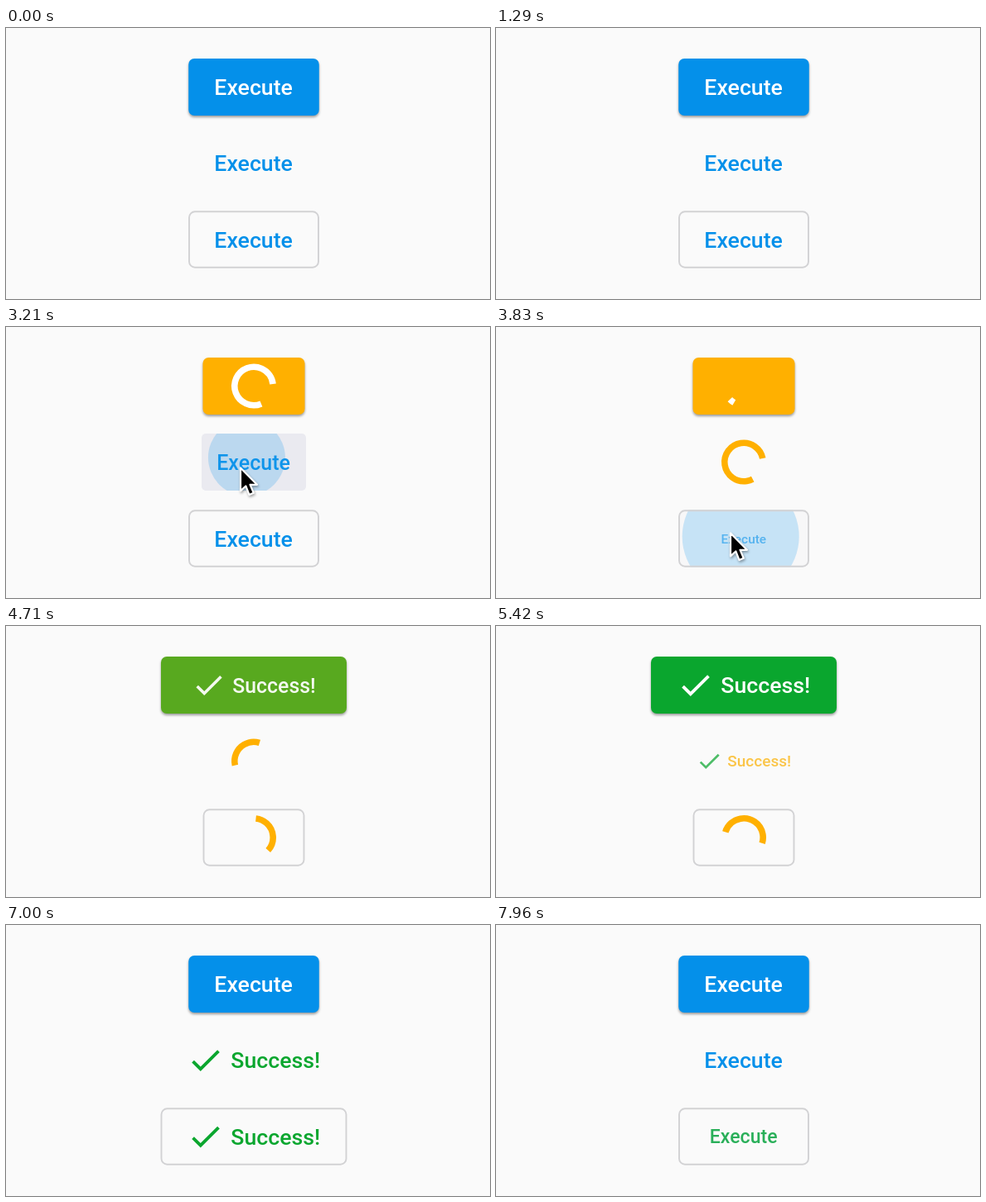
An HTML page that plays this animation: 584x328 px, repeating every 8000 ms.

```html
<!DOCTYPE html>
<html lang="en">
<head>
<meta charset="utf-8">
<title>Button states</title>
<style>
html, body { margin: 0; width: 100%; height: 100%; overflow: hidden; background: #fafafa; }
svg { display: block; width: 100vw; height: 100vh; }
text { font: 500 26.7px Roboto, sans-serif; }
</style>
</head>
<body>
<svg id="stage" viewBox="0 0 584 328"></svg>
<script>
const LOOP = 8000, MID = 299, HEIGHT = 69;
const LEAVE = 200, ENTER = 200, RESIZE_AT = 130, RESIZE = 160, TINT = 280;
const IDLE = 0;
const BLUE = [4, 144, 234], AMBER = [255, 176, 0], GREEN = [10, 166, 46];
const WHITE = '#fff';

const clamp = v => Math.min(1, Math.max(0, v));
const ramp = (t, start, length) => clamp((t - start) / length);
const lerp = (a, b, k) => a + (b - a) * k;
const smooth = x => x * x * (3 - 2 * x);
const mix = (a, b, k) => `rgb(${a.map((v, i) => Math.round(lerp(v, b[i], k)))})`;
const plain = color => mix(color, color, 0);

// cubic-bezier(.4, 0, .2, 1)
function ease(x) {
  let lo = 0, hi = 1, u = .5;
  for (let i = 0; i < 18; i++) {
    u = (lo + hi) / 2;
    const px = 1.2 * u * (1 - u) ** 2 + .6 * u * u * (1 - u) + u ** 3;
    if (px < x) lo = u; else hi = u;
  }
  return x <= 0 ? 0 : x >= 1 ? 1 : u * u * (3 - 2 * u);
}

function el(parent, tag, attrs = {}, text = '') {
  const node = document.createElementNS('http://www.w3.org/2000/svg', tag);
  set(node, attrs);
  node.textContent = text;
  return parent.appendChild(node);
}

function set(node, attrs) {
  for (const key in attrs) node.setAttribute(key, attrs[key]);
}

const stage = document.getElementById('stage');
const defs = el(stage, 'defs');

// changes: start of loading, success and reset
const buttons = [
  { kind: 'solid', y: 71.5, press: 2440, changes: [2570, 4374, 6462], spin: 2520, turn: -100,
    widths: [157.5, 123, 224], ripple: WHITE, reach: 82, hover: 0 },
  { kind: 'text', y: 163.5, press: 3100, changes: [3182, 5130, 7080], spin: 3002, turn: -158,
    widths: [126, 123, 193], ripple: plain(BLUE), reach: 68, hover: 1 },
  { kind: 'outline', y: 256, press: 3675, changes: [3767, 5818, 7644], spin: 3611, turn: -156,
    widths: [156, 121, 223], ripple: plain(BLUE), reach: 82, hover: .2 }
];

buttons.forEach((b, i) => {
  const solid = b.kind === 'solid';
  const clip = el(defs, 'clipPath', { id: 'clip' + i });
  b.clip = el(clip, 'rect', { rx: 7 });
  b.box = el(stage, 'rect', { rx: 7, fill: 'none' });
  b.glow = el(stage, 'rect', { rx: 5, fill: '#eaeaf0' });
  const inner = el(stage, 'g', { 'clip-path': `url(#clip${i})` });
  b.wave = el(inner, 'circle', { fill: b.ripple });
  if (b.kind === 'outline') {
    b.line = el(stage, 'rect', { rx: 7, fill: 'none', stroke: '#d2d2d4', 'stroke-width': 1.9 });
  }
  b.content = el(stage, 'g');

  const idle = el(b.content, 'g');
  b.label = el(idle, 'text', { x: -.4, y: 9.8, 'text-anchor': 'middle', fill: WHITE }, 'Execute');

  const loading = el(b.content, 'g');
  b.ring = el(loading, 'circle', {
    r: 23.2, fill: 'none', 'stroke-width': 7.6, pathLength: 125.66,
    stroke: solid ? WHITE : plain(AMBER)
  });

  const done = el(b.content, 'g');
  el(done, 'path', {
    d: 'M21 7 9 19 3.5 13.5 4.91 12.09 9 16.17 19.59 5.59Z',
    transform: 'translate(-81.5 -23) scale(1.92)', fill: solid ? WHITE : plain(GREEN)
  });
  b.message = el(done, 'text', { x: -27.7, y: 9.8, fill: WHITE }, 'Success!');
  b.views = [idle, loading, done];
});

const cursor = el(stage, 'path', {
  d: 'M0 0V30L6.8 23.6 11.3 35 17 32.6 12.4 21.8H21.4Z',
  fill: '#000', stroke: WHITE, 'stroke-width': 2.4, 'stroke-linejoin': 'round',
  style: 'filter: drop-shadow(1px 2px 1.5px rgba(0, 0, 0, .35))'
});

function drawSpinner(b, t) {
  const age = t - b.spin;
  const p = (((age / 1400) % 1) + 1) % 1;
  const grow = smooth(clamp(p * 2)), shift = smooth(clamp(p * 2 - 1));
  const dash = lerp(1, 100, grow);
  const offset = lerp(15 * grow, 125, shift);
  set(b.ring, {
    'stroke-dasharray': `${dash} 200`, 'stroke-dashoffset': -offset,
    transform: `rotate(${b.turn + age * .18})`
  });
}

function drawButton(b, t) {
  const step = b.changes.filter(c => t >= c).length;
  const state = step % 3, before = step ? step - 1 : IDLE;
  const start = step ? b.changes[step - 1] : -LOOP;
  const entered = start + LEAVE;
  const leaving = t < entered;
  const shown = leaving ? before : state;
  const scale = leaving ? 1 - ease(ramp(t, start, LEAVE)) : ease(ramp(t, entered, ENTER));
  const width = lerp(b.widths[before], b.widths[state], ease(ramp(t, start + RESIZE_AT, RESIZE)));
  const colors = [BLUE, AMBER, GREEN];
  const tint = delay => mix(colors[before], colors[state], ease(ramp(t, entered + delay, TINT)));

  b.views.forEach((view, i) => view.setAttribute('display', i === shown ? 'inline' : 'none'));
  set(b.content, { transform: `translate(${MID} ${b.y}) scale(${Math.max(scale, .001)})`, opacity: scale });

  const frame = { x: MID - width / 2, y: b.y - HEIGHT / 2, width, height: HEIGHT };
  set(b.box, frame);
  set(b.clip, frame);
  set(b.glow, frame);

  if (b.kind === 'solid') {
    const lift = ramp(t, b.press - 30, 130) * (1 - ramp(t, b.press + 160, 200));
    set(b.box, { fill: tint(15) });
    b.box.style.filter = `drop-shadow(0 ${lerp(2, 7, lift)}px ${lerp(1.8, 6, lift)}px rgba(0, 0, 0, .38))`;
  } else {
    const ink = tint(68);
    set(b.label, { fill: ink });
    set(b.message, { fill: ink });
  }
  if (b.line) set(b.line, { ...frame, y: b.y - 33.7, height: 67.4 });

  const grow = ease(ramp(t, b.press, 300));
  const fade = 1 - ramp(t, b.press + 220, 250);
  set(b.wave, {
    cx: lerp(280, MID, grow), cy: lerp(b.y - 12, b.y, grow), r: b.reach * lerp(.3, 1, grow),
    opacity: t < b.press ? 0 : fade * .2
  });
  b.glow.setAttribute('opacity', b.hover * ramp(t, b.press - 180, 150) * (1 - ramp(t, b.press + 200, 200)));

  drawSpinner(b, t);
}

function drawCursor(t) {
  let y = lerp(240, 87.5, ease(ramp(t, 1730, 530)));
  y = lerp(y, 170.5, ease(ramp(t, 2640, 380)));
  y = lerp(y, 249.5, ease(ramp(t, 3290, 360)));
  y = lerp(y, 273, ease(ramp(t, 3880, 280)));
  set(cursor, {
    transform: `translate(283 ${y}) scale(.93)`,
    opacity: ramp(t, 1730, 200) * (1 - ramp(t, 3930, 230))
  });
}

function draw(t) {
  buttons.forEach(b => drawButton(b, t));
  drawCursor(t);
}

const begin = performance.now();
function tick() {
  draw((performance.now() - begin) % LOOP);
  requestAnimationFrame(tick);
}
tick();
</script>
</body>
</html>
```
